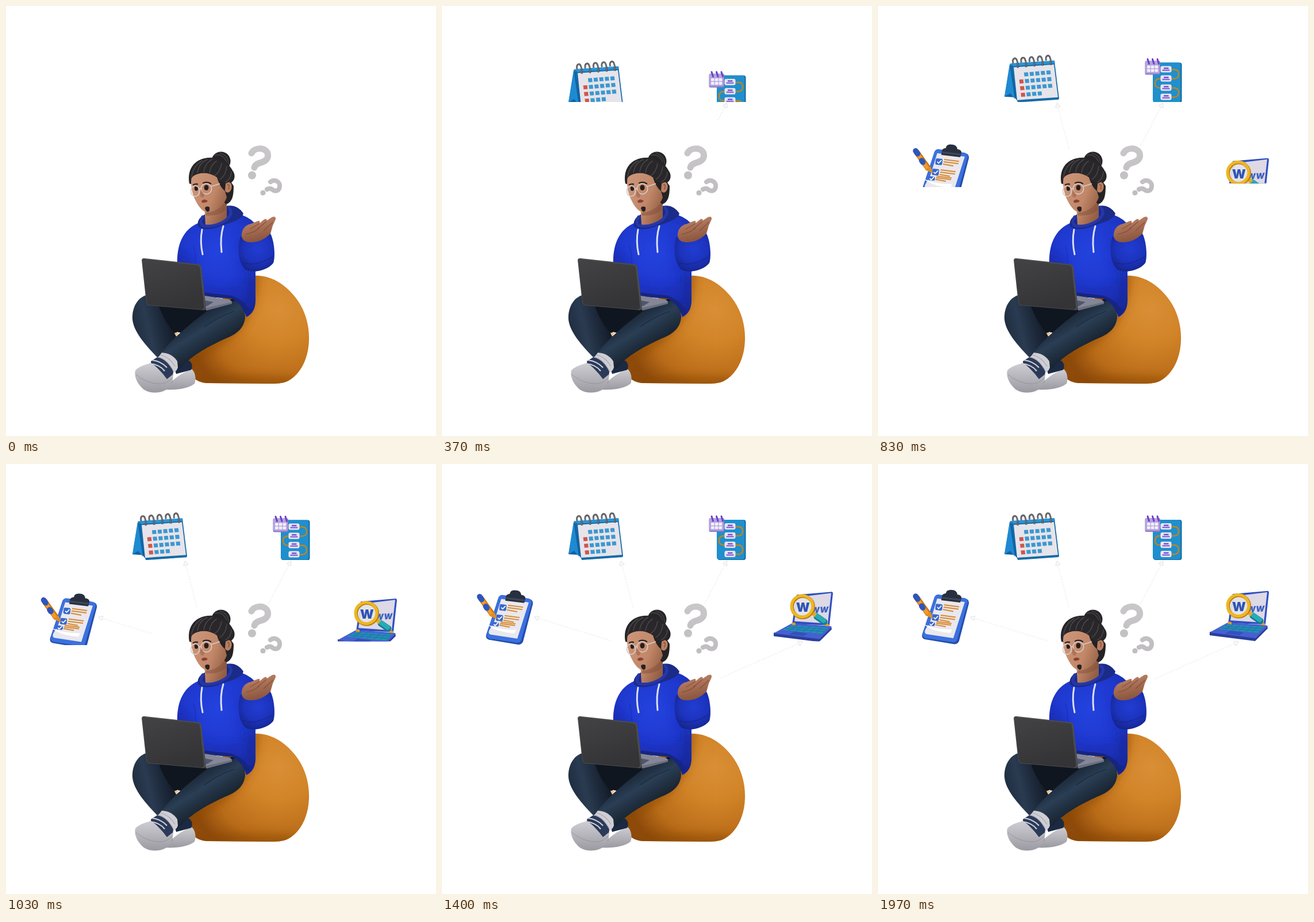
Animation of 748x748 px, one loop 5010 ms. Source, as an HTML page:

```html
<!DOCTYPE html>
<html lang="en">
<head>
<meta charset="utf-8">
<title>Planning ideas</title>
<style>
html,body{margin:0;width:100%;height:100%;overflow:hidden;background:#fff}
svg{display:block;width:100%;height:100%}
text{font-family:Inter,Arial,sans-serif;font-weight:900}
</style>
</head>
<body>
<svg viewBox="0 0 748 748">
<defs>
  <radialGradient id="bag" gradientUnits="userSpaceOnUse" cx="474" cy="528" r="165">
    <stop offset="0" stop-color="#d98f36"/><stop offset=".35" stop-color="#d28428"/><stop offset=".75" stop-color="#b96c18"/><stop offset="1" stop-color="#8f4b0c"/>
  </radialGradient>
  <radialGradient id="hoodie" gradientUnits="userSpaceOnUse" cx="368" cy="428" r="118">
    <stop offset="0" stop-color="#2342de"/><stop offset=".5" stop-color="#1f39cf"/><stop offset="1" stop-color="#162694"/>
  </radialGradient>
  <radialGradient id="cuff" gradientUnits="userSpaceOnUse" cx="438" cy="422" r="44">
    <stop offset="0" stop-color="#213dd2"/><stop offset=".55" stop-color="#1c33bd"/><stop offset="1" stop-color="#142384"/>
  </radialGradient>
  <linearGradient id="thigh" gradientUnits="userSpaceOnUse" x1="325" y1="545" x2="358" y2="598">
    <stop offset="0" stop-color="#1b2839"/><stop offset=".4" stop-color="#2a3e54"/><stop offset="1" stop-color="#17222e"/>
  </linearGradient>
  <linearGradient id="knee" gradientUnits="userSpaceOnUse" x1="220" y1="560" x2="285" y2="545">
    <stop offset="0" stop-color="#1f2c3e"/><stop offset=".4" stop-color="#2a3b51"/><stop offset="1" stop-color="#141d2b"/>
  </linearGradient>
  <linearGradient id="skin" gradientUnits="userSpaceOnUse" x1="322" y1="320" x2="388" y2="345">
    <stop offset="0" stop-color="#cb9477"/><stop offset=".55" stop-color="#c18768"/><stop offset="1" stop-color="#925d44"/>
  </linearGradient>
  <linearGradient id="palm" x1="0" y1="0" x2=".3" y2="1">
    <stop offset="0" stop-color="#c48b6e"/><stop offset="1" stop-color="#8b553e"/>
  </linearGradient>
  <linearGradient id="lid" x1="0" y1="0" x2=".4" y2="1">
    <stop offset="0" stop-color="#434345"/><stop offset="1" stop-color="#343436"/>
  </linearGradient>
  <linearGradient id="sole" x1="0" y1="0" x2="0" y2="1">
    <stop offset="0" stop-color="#cfced3"/><stop offset="1" stop-color="#9b9aa2"/>
  </linearGradient>
  <linearGradient id="mark" gradientUnits="userSpaceOnUse" x1="0" y1="243" x2="0" y2="330">
    <stop offset="0" stop-color="#c9c7c9"/><stop offset="1" stop-color="#bfbdbf"/>
  </linearGradient>
  <filter id="soft" x="-50%" y="-50%" width="200%" height="200%"><feGaussianBlur stdDeviation="7"/></filter>
  <clipPath id="clipTop"><rect x="200" y="60" width="350" height="107"/></clipPath>
  <clipPath id="clipLeft"><rect x="40" y="180" width="140" height="135"/></clipPath>
  <clipPath id="clipRight"><rect x="560" y="180" width="140" height="128.5"/></clipPath>
  <clipPath id="bagShape"><use href="#bagPath"/></clipPath>
  <clipPath id="bodyShape"><use href="#bodyPath"/></clipPath>
</defs>

<g id="person">
  <!-- bean bag -->
  <path id="bagPath" fill="url(#bag)" d="M425 470C453 465 482 480 502 505C520 527 528 554 527 582C526 613 513 640 491 652C481 657 470 657 456 657L350 656C332 655 320 645 312 625L298 576L330 545Z"/>
  <g clip-path="url(#bagShape)">
    <g filter="url(#soft)">
      <path d="M425 465L440 465C440 545 400 580 335 618L300 640V560Z" fill="#8a4708" opacity=".5"/>
      <path d="M315 648Q420 638 505 646V672H315Z" fill="#8a4708" opacity=".5"/>
    </g>
  </g>
  <!-- rear foot -->
  <path fill="url(#sole)" d="M276 667C288 650 304 640 322 631C330 636 331 650 328 657C318 665 296 669 276 667Z"/>
  <path fill="#1b2942" d="M288 615L319 617C324 621 325 628 322 633L296 640Z"/>
  <!-- legs -->
  <path fill="#10161f" d="M246 508L348 520L400 508L416 540L310 570L298 567L293 570L280 568L256 536Z"/>
  <path fill="url(#knee)" d="M248 502C230 505 219 523 220 545C222 567 243 590 263 611L290 603L300 580L293 569C281 555 272 540 266 522Z"/>
  <path fill="#f5c287" d="M293 568.500L301 568L296 575Z"/>
  <path fill="url(#thigh)" d="M361 522C334 543 296 570 271 603Q286 607 296 623Q299 632 303 630C324 607 354 591 383 578C404 570 415 558 416 541Q416 522 400 512Z"/>
  <path fill="none" stroke="#111b29" stroke-width="1.2" opacity=".6" d="M345 558Q370 540 397 531"/>
  <!-- front foot -->
  <path fill="#cfced4" d="M271 603Q289 604 298 618L299 629Q296 637 290 638L264 612Z"/>
  <path fill="none" stroke="#a7a6b2" stroke-width="1.2" d="M269 607Q285 611 294 627M267 611Q281 616 291 634"/>
  <path fill="#2b3a58" d="M263 611Q280 614 291 636L289 655L276 663L240 632Q254 626 252 618Z"/>
  <path fill="none" stroke="#d0d1da" stroke-width="2.2" d="M254 616Q270 618 280 629M250 622Q268 624 276 635"/>
  <path fill="url(#sole)" d="M225 634C231 627 242 624 252 621C262 627 272 638 280 649L290 641C292 650 288 660 278 668C267 674 251 674 241 668C230 660 222 645 225 634Z"/>
  <path fill="none" stroke="#8b8c94" stroke-width="1" opacity=".7" d="M226 641C237 650 252 658 271 657Q281 656 289 647"/>
  <!-- torso -->
  <path id="bodyPath" fill="url(#hoodie)" d="M336 377C307 388 297 417 298 448L342 505L392 509C404 514 413 524 418 541C429 536 434 526 434 511V462L450 430L432 377Q420 365 404 362L370 384Z"/>
  <g clip-path="url(#bodyShape)">
    <g filter="url(#soft)">
      <path d="M296 420Q319 440 330 453L300 465Z" fill="#14259b" opacity=".5"/>
      <path d="M406 395Q398 430 414 462L438 470L430 530L417 525Q424 470 405 450Z" fill="#14259b" opacity=".55"/>
      <path d="M340 478Q374 499 411 483L415 512H345Z" fill="#1a2eb8" opacity=".7"/>
    </g>
    <path d="M345 503L390 508Q410 514 421 533" fill="none" stroke="#17257f" stroke-width="9"/>
    <path d="M326 418Q331 433 330 447M410 411Q403 428 408 446" fill="none" stroke="#1729a8" stroke-width="1.4" opacity=".55"/>
  </g>
  <!-- neck, hood -->
  <path fill="#1b2b88" d="M382 348Q402 344 413 361C410 372 389 378 375 382C359 390 340 390 334 383Q331 370 347 362Z"/>
  <path fill="url(#skin)" d="M345 348L347 381Q366 387 384 371L384 335Z"/>
  <path fill="#7c4c37" opacity=".45" d="M349 357Q371 354 383 340V355Q367 367 347 364Z"/>
  <path fill="none" stroke="#2537a8" stroke-width="5" stroke-linecap="round" d="M388 351Q397 360 382 373Q362 386 342 382Q336 376 342 367"/>
  <path fill="none" stroke="#dce0f0" stroke-width="3" stroke-linecap="round" d="M341 389Q337 410 342 432M378 383Q372 402 375 428"/>
  <!-- head -->
  <circle cx="374" cy="270" r="16.500" fill="#262427"/>
  <path d="M362 260Q377 255 384 272M371 255Q387 260 387 275" fill="none" stroke="#444144" stroke-width="1.500"/>
  <path fill="#242225" d="M319 309C315 288 324 270 345 265C365 260 386 270 394 286C400 294 398 303 392 307L396 313C396 330 394 341 383 345L358 320Z"/>
  <path fill="url(#skin)" d="M323 297C320 311 324 328 330 339C336 351 343 359 352 359C366 357 379 348 384 333L381 322C374 316 370 308 367 298Q345 283 323 297Z"/>
  <path fill="#b97f61" d="M382 309C388 302 395 309 392 318C390 325 384 327 381 321Z"/>
  <path fill="none" stroke="#85523c" stroke-width="1.4" d="M385 311Q390 309 387 319"/>
  <path fill="#29272a" d="M319 307C318 282 333 266 354 264C376 264 392 278 395 291C398 300 390 306 381 309Q374 306 367 298C355 289 338 288 327 295Q321 299 319 307Z"/>
  <path fill="none" stroke="#4a474a" stroke-width="1.5" stroke-linecap="round" d="M323 296Q326 278 341 269M333 290Q335 274 350 267M344 288Q346 274 358 267M354 290Q356 276 366 270M363 295Q372 290 375 274M372 302Q383 294 384 279M382 306Q391 301 392 289"/>
  <path fill="none" stroke="#322322" stroke-width="2.4" stroke-linecap="round" d="M326 311Q329 309 333 310M343 308Q350 305 356 309"/>
  <ellipse cx="331" cy="317" rx="3.2" ry="4.6" fill="#2a1c1b"/>
  <ellipse cx="348.500" cy="316" rx="4" ry="4.8" fill="#2a1c1b"/>
  <g fill="none" stroke="#d5cdc8" stroke-width="1.700">
    <ellipse cx="329" cy="322" rx="7.500" ry="9.200"/>
    <circle cx="348.500" cy="318" r="9.200"/>
    <path d="M336 319Q338 316 340 318M357 314L372 309"/>
  </g>
  <path fill="#b07358" d="M339 320Q336 333 341 333Q346 333 345 328Z"/>
  <path fill="#8b4036" d="M340 339Q345 334 351 339Q348 343 341 342Z"/>
  <path fill="#282123" d="M346 351Q349 347 354 350Q355 357 351 358Q347 357 346 351Z"/>
  <!-- raised arm -->
  <path fill="url(#cuff)" d="M408 401C422 407 447 404 460 396C467 409 469 437 465 447C456 459 433 465 419 460C405 453 401 419 408 401Z"/>
  <path fill="none" stroke="#152488" stroke-width="2" opacity=".55" d="M411 446Q433 455 464 436"/>
  <path fill="url(#palm)" d="M410 401C409 390 415 381 426 379L438 374Q443 373 441 378L448 372Q453 368 454 373L463 367Q470 365 469 371L464 382L460 396C450 406 438 412 423 411Q412 410 410 401Z"/>
  <path fill="none" stroke="#81462f" stroke-width="1.2" opacity=".75" d="M424 388Q432 384 441 378M437 388L453 375M448 391Q458 382 464 376M417 397Q433 394 441 386"/>
  <!-- computer -->
  <path fill="#858796" d="M340 503L389 511Q395 514 392 517L348 529Z"/>
  <path fill="#4e5670" d="M345 512L361 515L350 522L345 522Z"/>
  <path fill="#6b6f80" d="M348 525L393 515V518L348 530Z"/>
  <path fill="#4b4b4e" d="M236 442Q237 438 242 439L334 449Q339 450 340 454L348 525Q347 530 342 529L249 521Q245 520 244 516Z"/>
  <path fill="url(#lid)" d="M237 443Q238 440 242 441L332 451Q336 451 337 455L344.500 524Q344 528 340 528L250 520Q246 519 245 516Z"/>
  <!-- question marks -->
  <g fill="none" stroke="url(#mark)" stroke-linecap="round">
    <path stroke-width="11" d="M427 256C432 246 450 245 455 256C458 267 449 271 441 273Q433 276 432 281"/>
    <path stroke-width="8" d="M460 306C467 300 478 306 476 315C474 324 466 322 463 319Q459 316 454 319"/>
  </g>
  <circle cx="428" cy="294.500" r="7" fill="#c3c1c3"/>
  <circle cx="447" cy="325" r="4.600" fill="#bfbdbf"/>
</g>

<g clip-path="url(#clipTop)">
  <g id="calendar">
    <path fill="#1261a2" d="M230 98L220 157L237 158L244 166L251 164Z"/>
    <path fill="#1e8ad2" d="M229 100L220 157L230 151L238 161Z"/>
    <path fill="#166ba8" d="M231 100L307 95L315 160L314 162L243 167Z"/>
    <path fill="#e6e4ea" d="M236 106L306 101L313 158L242 163Z"/>
    <path fill="#2b93d4" d="M231 99L307 94L308 99L235 104Z"/>
  </g>
  <g id="chart">
    <rect x="479" y="97" width="49.500" height="70" rx="4" fill="#1269a3"/>
    <rect x="478" y="97" width="48.500" height="69" rx="4" fill="#1f8fcd"/>
    <path fill="none" stroke="#bd861f" stroke-width="2.400" d="M510 109H515Q523 109 523 117T515 125H490Q482 125 482 133T490 141H515Q523 141 523 149T515 157H510"/>
    <rect x="464.500" y="94" width="26.500" height="24" rx="2.500" fill="#8c77c9"/>
    <rect x="465" y="94" width="25" height="22" rx="2" fill="#b3a3de"/>
  </g>
</g>

<g clip-path="url(#clipLeft)">
  <g id="clipboard">
    <path fill="#234ead" d="M105 228L151 234Q159 235 158 243L141 308Q138 315 130 313L82 305Q75 303 77 296L98 233Q100 228 105 228Z"/>
    <path fill="#3b70df" d="M105 227L150 233Q157 235 156 241L138 305Q136 311 130 310L83 303Q77 301 78 296L98 232Q100 227 105 227Z"/>
    <path fill="#e9e8ee" d="M103 234L151 240L131 303L85 296Q80 295 82 289L91 273Z"/>
    <path fill="#fff" d="M78 277Q91 287 129 288L126 294Q91 291 78 277Z"/>
    <path fill="#28303f" d="M111 231Q111 226 118 225Q119 218 128 219Q137 219 138 227Q146 228 145 234L143 241L110 237Z"/>
    <path fill="#3d4758" d="M112 231L144 235L143 238L111 234Z"/>
  </g>
</g>

<g clip-path="url(#clipRight)">
  <g id="notebook">
    <path fill="#304fc2" d="M617 226L676 221Q680 220 680 224L674 279L609 277Z"/>
    <path fill="#ddd9e5" d="M620 230L677 223L671 276L613 272Z"/>
    <text x="642" y="258" font-size="14" font-style="italic" fill="#3b5fc3" transform="rotate(-3 642 258)">WW</text>
    <path fill="#2a3e9e" d="M577 292L577 298L656 308L678 286L677 281Z"/>
    <path fill="#4660d2" d="M608 276L674 280L678 282L657 303L577 293Z"/>
    <path fill="#1d95ac" d="M608 279L672 283L661 294L592 287Z"/>
    <path fill="none" stroke="#2f62ba" stroke-width="1" d="M604 282L669 286M598 285L665 290M618 279L604 288M629 280L616 289M640 281L628 290M651 282L639 292M661 282L650 293"/>
    <path fill="#3551bb" d="M613 290L636 293L629 298L603 295Z"/>
    <path fill="#e2a022" d="M609 274L615 275V279L608 278ZM667 276L673 277V281L666 280Z"/>
    <path stroke="#147c91" stroke-width="11" stroke-linecap="round" d="M652 264L665 273"/>
    <path stroke="#28abb8" stroke-width="8" stroke-linecap="round" d="M650 261L664 271"/>
    <path stroke="#e4aa25" stroke-width="7" d="M642 256L650 262"/>
    <circle cx="626.500" cy="246.500" r="18.500" fill="#e7e3e9" opacity=".92"/>
    <text x="616" y="256" font-size="22" fill="#2d54b3">W</text>
    <circle cx="627.500" cy="247" r="18.500" fill="none" stroke="#b97b0c" stroke-width="6"/>
    <circle cx="626.500" cy="246" r="18.500" fill="none" stroke="#eeb721" stroke-width="5"/>
  </g>
</g>
<g id="arrows" stroke="#e2e2e5" fill="none"></g>
</svg>

<script>
const LOOP = 5010, RISE = 0.006, WIPE = 0.0093;
const $ = id => document.getElementById(id);

function add(parent, tag, attrs) {
  const el = document.createElementNS("http://www.w3.org/2000/svg", tag);
  for (const k in attrs) el.setAttribute(k, attrs[k]);
  parent.appendChild(el);
  return el;
}
const path = (parent, d, attrs) => add(parent, "path", { d, ...attrs });
const box = (parent, x, y, width, height, fill, rx = 0) =>
  add(parent, "rect", { x, y, width, height, fill, rx });

function drawCalendar() {
  const g = $("calendar");
  for (let row = 0; row < 4; row++) {
    for (let col = row ? 0 : 1; col < (row === 3 ? 4 : 6); col++) {
      const x = 248 + col * 9.7 + row * 1.4, y = 119 - col * 0.8 + row * 11.6;
      path(g, `M${x - 3.8} ${y - 3.2}l7 -.5l.8 6.8l-7 .5z`, { fill: col ? "#3b98d0" : "#d0564c" });
    }
  }
  for (let i = 0; i < 5; i++) {
    const x = 239 + i * 14.4, y = 97 - i * 1.2;
    const d = `M${x - 4} ${y + 2}C${x - 6} ${y - 7} ${x + 1} ${y - 10} ${x + 3} ${y - 2}Q${x + 5} ${y + 5} ${x + 4} ${y + 10}`;
    path(g, d, { fill: "none", stroke: "#3a3a3f", "stroke-width": 2.8 });
    path(g, d, { fill: "none", stroke: "#aaaab0", "stroke-width": 0.9 });
  }
}

function drawChart() {
  const g = $("chart");
  for (let i = 0; i < 4; i++) {
    const y = 103 + i * 16;
    box(g, 491.5, y, 19, 11, "#e9e6f3", 3);
    box(g, 497, y + 2.5, 8.5, 2.5, "#7952cf");
    box(g, 494.5, y + 6, 13, 2.5, "#8c6bd5");
  }
  for (let i = 0; i < 6; i++) {
    box(g, 468 + i % 3 * 6.8, 102 + (i > 2) * 6.2, 5.6, 5, "#f2effa", 0.7);
  }
  for (let i = 0; i < 3; i++) {
    path(g, `M${469 + i * 8.5} 91l2.5 8`, { stroke: "#6a42c9", "stroke-width": 3, "stroke-linecap": "round" });
  }
}

function drawClipboard() {
  const g = $("clipboard");
  [[106, 249], [100, 267], [93, 278]].forEach(([x, y], i) => {
    const h = i === 2 ? 7 : 11;
    add(g, "rect", { x: x - 6, y: y - h / 2, width: 12, height: h, rx: 2.5, fill: "#3768cd", transform: `rotate(7 ${x} ${y})` });
    path(g, `M${x - 3} ${y}l2.5 2.5l5 -5`, { fill: "none", stroke: "#fff", "stroke-width": 1.7 });
    for (let k = 0; k < 3; k++) {
      const step = i === 2 ? 2.8 : 4;
      path(g, `M${x + 9 - k} ${y - 4 + k * step}l${k === 2 ? 18 : 26} 3.4`, { stroke: "#d9892d", "stroke-width": 2 });
    }
  });
  path(g, "M67 232L87 260", { stroke: "#c77716", "stroke-width": 10, "stroke-linecap": "round" });
  path(g, "M66 231L86 260", { stroke: "#ef9b2b", "stroke-width": 6.5, "stroke-linecap": "round" });
  path(g, "M65.5 230L69 235M76 247L78 250", { stroke: "#2e55bc", "stroke-width": 9.5, "stroke-linecap": "round" });
  path(g, "M82 263L91 257L96 269Z", { fill: "#e38c20" });
}

// Each icon climbs out of its clip edge: id, height, start time
const icons = [
  ["calendar", 84, 30], ["chart", 84, 160],
  ["clipboard", 97, 583], ["notebook", 88, 715]
].map(([id, height, start]) => ({ el: $(id), height, start }));

// Arrows are wiped in from tip to tail: tip, tail, start time
const arrows = [
  [311, 168, 333, 252, 466], [496, 168, 457, 243, 315],
  [160, 266, 296, 308, 908], [628, 309, 481, 374, 1036]
].map(([x, y, tx, ty, start]) => {
  const length = Math.hypot(tx - x, ty - y);
  const angle = Math.atan2(ty - y, tx - x) * 180 / Math.PI;
  const el = add($("arrows"), "g", { transform: `translate(${x} ${y}) rotate(${angle})` });
  const head = path(el, "M1 0L8 -4V4Z", { "stroke-width": 1.1, "stroke-linejoin": "round" });
  const line = path(el, "", { "stroke-width": 1.7, "stroke-linecap": "round", "stroke-dasharray": "0.1 4.4" });
  return { el, head, line, length, start };
});

function render(t) {
  for (const { el, height, start } of icons) {
    const on = t >= start;
    el.style.display = on ? "" : "none";
    if (on) el.setAttribute("transform", `translate(0 ${height * Math.exp(-RISE * (t - start))})`);
  }
  for (const { el, head, line, length, start } of arrows) {
    const shown = length * (1 - Math.exp(-WIPE * Math.max(0, t - start)));
    el.style.display = shown > 1 ? "" : "none";
    head.style.display = shown > 7 ? "" : "none";
    line.setAttribute("d", shown > 11 ? `M11 0H${shown}` : "");
  }
}

drawCalendar();
drawChart();
drawClipboard();
const begin = performance.now();
function tick() {
  render((performance.now() - begin) % LOOP);
  requestAnimationFrame(tick);
}
tick();
</script>
</body>
</html>
```
